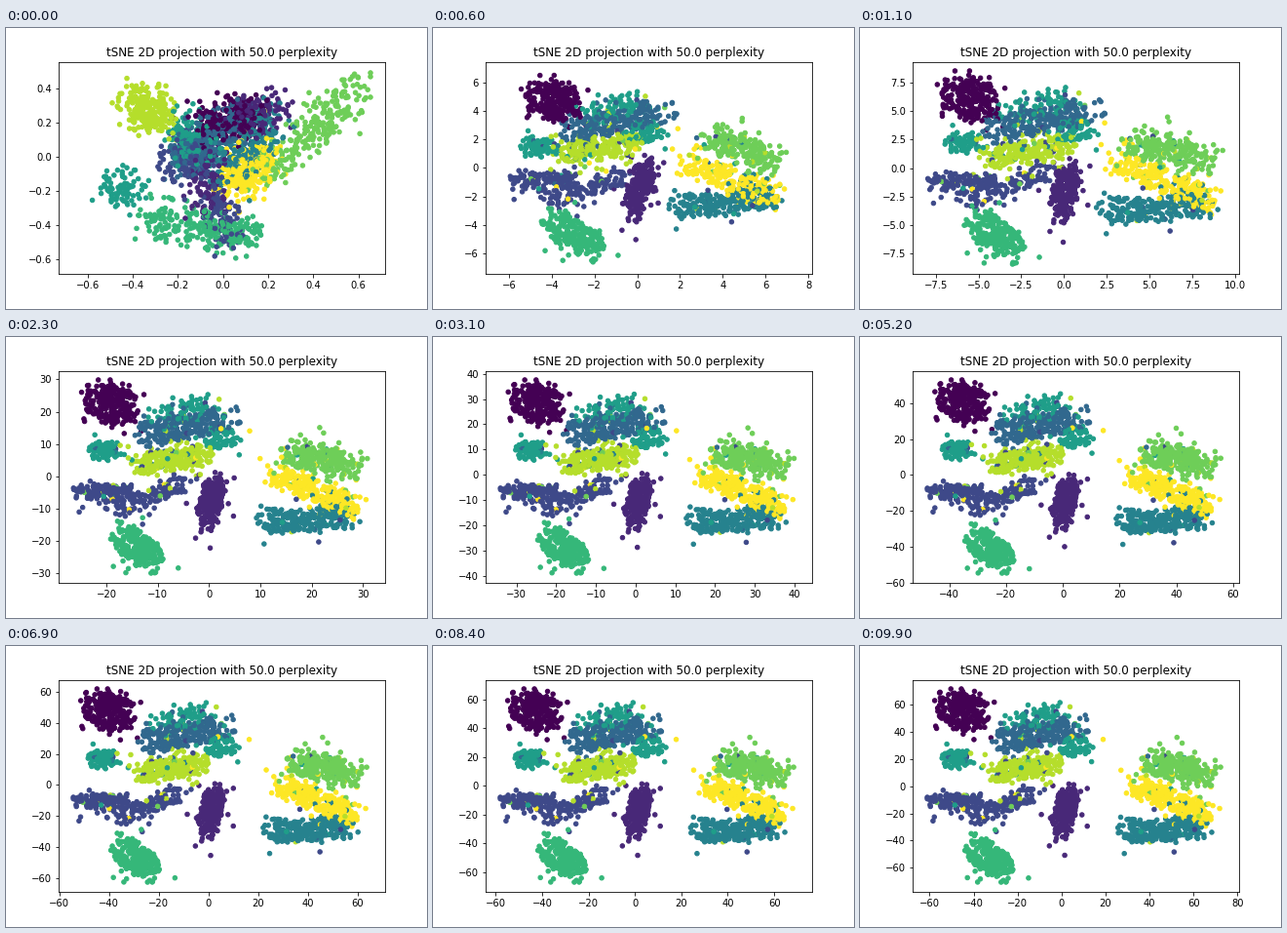
Recreate the animation shown at these times as a matplotlib script. Size 432 by 288 pixels, loop 10 s.

```python
import numpy as np
import matplotlib.pyplot as plt
from matplotlib.animation import FuncAnimation
from matplotlib.transforms import IdentityTransform

W, H, FRAMES = 432, 288, 100
PER_DIGIT = 250
RELEASE = 11  # the clusters have formed and start to spread
CENTRE = np.array([212, 143])
rng = np.random.default_rng(50)

# digit, radius, axis of the starting cloud, axis of the final cluster (pixels)
clusters = [
    (0, 20, (205, 100, 255, 88), (96, 64, 115, 70)),
    (1, 11, (245, 94, 280, 86), (215, 150, 210, 172)),
    (1, 13, (205, 125, 210, 185), (210, 165, 206, 190)),
    (2, 8, (170, 135, 205, 130), (74, 160, 122, 159)),
    (2, 10, (210, 165, 228, 215), (112, 177, 172, 153)),
    (3, 13, (180, 140, 235, 90), (148, 97, 224, 83)),
    (4, 13, (225, 150, 270, 95), (275, 190, 350, 186)),
    (5, 9, (112, 165, 130, 163), (90, 116, 112, 115)),
    (5, 13, (175, 100, 200, 110), (157, 80, 205, 68)),
    (5, 11, (185, 125, 210, 120), (210, 102, 228, 104)),
    (6, 15, (148, 195, 255, 215), (121, 209, 145, 228)),
    (7, 15, (362, 62, 265, 150), (300, 120, 358, 131)),
    (8, 11, (132, 76, 160, 92), (139, 130, 200, 120)),
    (9, 12, (232, 165, 265, 130), (280, 142, 356, 173)),
]

# frame, x limits, y limits
limits = np.array([
    (0, -0.729, 0.7178, -0.686, 0.557),
    (11, -8.853, 10.23, -9.30, 9.34),
    (23, -29.3, 34.25, -33.0, 32.7),
    (40, -45.1, 53.1, -51.4, 48.6),
    (52, -52.9, 62.0, -60.05, 58.1),
    (69, -60.2, 71.0, -68.9, 67.9),
    (99, -67.75, 80.6, -77.9, 78.5),
])


def split(axis):
    """Midpoint and direction of a line segment."""
    a, b = np.array(axis[:2]), np.array(axis[2:])
    return (a + b) / 2, b - a


def scatter_cluster(n, radius, cloud, home):
    """Positions of n points at the start, on release and at the end."""
    along = rng.uniform(-0.5, 0.5, (n, 1))
    angle = rng.uniform(0, 2 * np.pi, n)
    stray = rng.uniform(0, 18, n) * (rng.random(n) < 0.08)
    reach = radius * np.sqrt(rng.random(n)) + stray
    across = reach[:, None] * np.column_stack([np.cos(angle), np.sin(angle)])

    mid, line = split(cloud)
    start = mid + along * line + rng.normal(0, 11, (n, 2))
    mid, line = split(home)
    late = mid + along * line + across
    early = mid + 0.08 * (CENTRE - mid) + 1.35 * along * line + 1.1 * across
    # Early clusters are stringy
    early = early + 2.2 * np.sin(early[:, ::-1] / 2.7)
    return np.stack([start, early, late])


digits = [c[0] for c in clusters]
sizes = [PER_DIGIT // digits.count(d) for d in digits]
label = np.repeat(digits, sizes)
layout = np.concatenate([scatter_cluster(n, *c[1:]) for n, c in zip(sizes, clusters)], axis=1)

# Some easily confused digits land in each other's clusters
mixed = np.flatnonzero(~np.isin(label, [0, 1, 6]) & (rng.random(len(label)) < 0.06))
layout[1:, mixed] = layout[1:, rng.permutation(mixed)]

# The axes keep a 5 % margin around the points
layout = np.clip(layout, (69, 44), (374, 242))
order = rng.permutation(len(label))
label, (start, early, late) = label[order], layout[:, order]

fig, ax = plt.subplots(figsize=(W / 72, H / 72), dpi=72)
fig.subplots_adjust(left=0.125, right=0.9, bottom=0.125, top=0.88)
ax.set_title("tSNE 2D projection with 50.0 perplexity")
dots = ax.scatter(*start.T, 20, label, cmap="viridis", transform=IdentityTransform())


def draw(i):
    settle = 1 - (1 - min(i / RELEASE, 1)) ** 3
    spread = 1 - (RELEASE / max(i, RELEASE)) ** 1.3
    pos = early + (late - early) * spread
    pos = start + (pos - start) * settle
    dots.set_offsets(np.column_stack([pos[:, 0], H - pos[:, 1]]))

    x0, x1, y0, y1 = (np.interp(np.log1p(i), np.log1p(limits[:, 0]), col)
                      for col in limits[:, 1:].T)
    ax.set_xlim(x0, x1)
    ax.set_ylim(y0, y1)
    return dots,


anim = FuncAnimation(fig, draw, frames=FRAMES, interval=100, repeat=True, repeat_delay=0)
plt.show()
```
